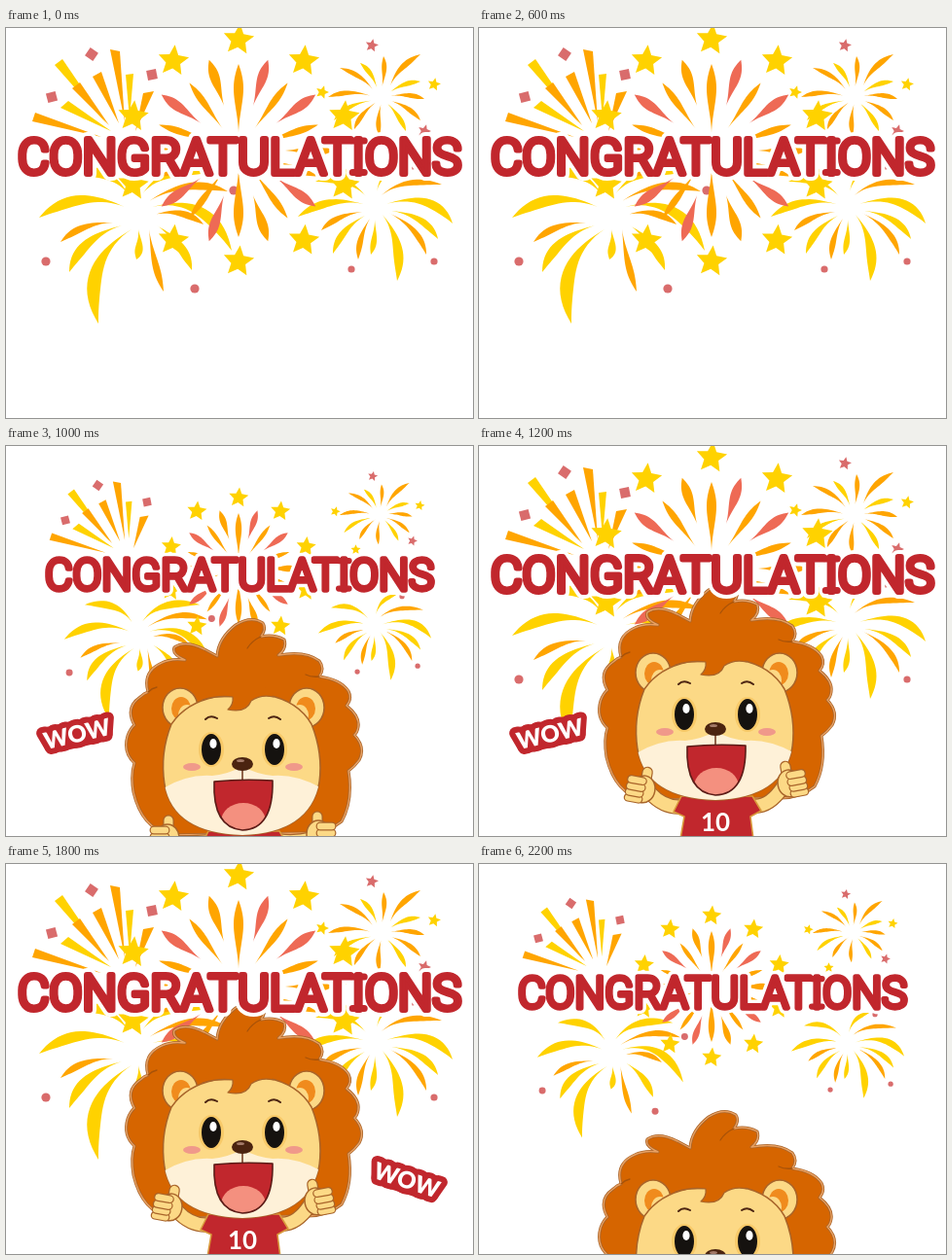
Write an HTML page with a canvas that moves like this. It is 480 px wide and 401 px high and loops after 2400 ms.

```html
<!DOCTYPE html>
<html lang="en">
<head>
<meta charset="utf-8">
<title>Congratulations</title>
<style>
html, body { margin: 0; width: 100%; height: 100%; overflow: hidden; background: #fff; }
canvas { display: block; width: 480px; height: 401px; }
</style>
</head>
<body>
<canvas id="stage" width="480" height="401" aria-label="Congratulations"></canvas>
<script>
const g = document.getElementById('stage').getContext('2d');
const YELLOW = '#ffd200', ORANGE = '#ffa500', CORAL = '#ee6a55', PINK = '#d96c6c';
const RED = '#c1272d', MANE = '#d66500', SKIN = '#fcd986', LINE = '#a8642a';
const STEP = 200, STEPS = 12;

// Transform [scale, dx, dy] of every burst for the large, small and medium beat
const BEATS = {
  title: [1, .762, .878],
  fan: [[1, 0, 0], [.515, 52.8, 45.7], [.815, 22.7, 18.5]],
  spark: [[1, 0, 0], [.47, 202, 37.5], [.755, 93, 17.5]],
  left: [[1, 0, 0], [.444, 75.8, 116.4], [.758, 34, 51]],
  right: [[1, 0, 0], [.48, 196.6, 95], [.73, 101.9, 51]],
  ring: [[1, 239, 126], [.425, 239, 126], [.64, 239, 126]]
};

// Lion per step: drop below full height and how far the hands are raised
const LION = { 4: [112, 0], 5: [36, 0], 6: [0, 1], 7: [0, 0], 8: [0, .5], 9: [0, 1], 10: [36, 1], 11: [112, 0] };

function fill(path, color, line, width = 1.5) {
  const p = typeof path === 'string' ? new Path2D(path) : path;
  g.fillStyle = color;
  g.fill(p);
  if (line) {
    g.strokeStyle = line;
    g.lineWidth = width;
    g.stroke(p);
  }
}

function oval(x, y, rx, ry, color, line) {
  const p = new Path2D();
  p.ellipse(x, y, rx, ry, 0, 0, 7);
  fill(p, color, line);
}

function line(d, color, width) {
  g.strokeStyle = color;
  g.lineWidth = width;
  g.stroke(new Path2D(d));
}

function tube(d, width) {
  line(d, LINE, width + 2.4);
  line(d, SKIN, width);
}

function poly(pts, color) {
  g.fillStyle = color;
  g.beginPath();
  pts.forEach(([x, y]) => g.lineTo(x, y));
  g.closePath();
  g.fill();
}

function star(x, y, r, color, turn = 0) {
  const pts = [];
  for (let i = 0; i < 10; i++) {
    const a = turn + i * Math.PI / 5, q = i % 2 ? r * .47 : r;
    pts.push([x + q * Math.sin(a), y - q * Math.cos(a)]);
  }
  poly(pts, color);
}

// Curved stroke, pointed at the start and fuller toward its end
function plume(x0, y0, cx, cy, x1, y1, w, color) {
  const a = [], b = [];
  for (let i = 0; i <= 20; i++) {
    const t = i / 20, u = 1 - t;
    const x = u * u * x0 + 2 * u * t * cx + t * t * x1;
    const y = u * u * y0 + 2 * u * t * cy + t * t * y1;
    const dx = u * (cx - x0) + t * (x1 - cx), dy = u * (cy - y0) + t * (y1 - cy);
    const k = w / 2 * Math.sin(Math.PI * Math.pow(t, 1.6)) / (Math.hypot(dx, dy) || 1);
    a.push([x - dy * k, y + dx * k]);
    b.unshift([x + dy * k, y - dx * k]);
  }
  poly(a.concat(b), color);
}

function placed([s, x, y], draw) {
  g.save();
  g.translate(x, y);
  g.scale(s, s);
  draw();
  g.restore();
}

function fan() {
  [[50, 38, 58, 32, 103, 98, YELLOW], [89, 50, 98, 45, 116, 98, ORANGE],
   [107, 22, 117, 24, 122, 96, ORANGE], [123, 48, 131, 47, 127, 94, YELLOW],
   [141, 67, 152, 65, 133, 106, ORANGE], [56, 82, 64, 75, 108, 106, YELLOW],
   [27, 96, 30, 87, 98, 112, ORANGE], [68, 62, 76, 56, 106, 100, ORANGE]
  ].forEach(([a, b, c, d, e, f, col]) => poly([[a, b], [c, d], [e, f]], col));
  [[88, 27, .6], [47, 71, -.25], [150, 48, -.2]].forEach(([x, y, r]) => {
    g.save();
    g.translate(x, y);
    g.rotate(r);
    g.fillStyle = PINK;
    g.fillRect(-5, -5, 10, 10);
    g.restore();
  });
}

function spark() {
  [[426, 27, 402, 40, 6], [388, 29, 390, 45, 5], [364, 36, 377, 46, 5], [343, 41, 366, 48, 5],
   [331, 71, 352, 63, 5], [337, 95, 350, 78, 5], [358, 104, 364, 88, 5], [384, 111, 381, 94, 5],
   [411, 106, 405, 90, 5], [426, 95, 414, 80, 5], [430, 73, 414, 67, 5], [426, 55, 408, 56, 5]
  ].forEach(([x, y, cx, cy, w], i) =>
    plume(386 + (x - 386) * .22, 69 + (y - 69) * .22, cx, cy, x, y, w, i % 3 === 2 ? YELLOW : ORANGE));
  star(376, 18, 7, PINK, .2);
  star(430, 106, 7, PINK, .3);
  star(440, 58, 7, YELLOW, .2);
  star(325, 66, 7, YELLOW, .3);
  star(353, 118, 7, YELLOW);
}

function dots(list, r) {
  list.forEach(([x, y]) => oval(x, y, r, r, PINK));
}

function leftPalm() {
  [[122, 184, 76, 164, 34, 195, 11, YELLOW], [126, 172, 108, 142, 62, 148, 10, YELLOW],
   [110, 200, 78, 200, 56, 220, 7, ORANGE], [119, 203, 77, 215, 65, 251, 10, YELLOW],
   [129, 207, 76, 240, 95, 304, 14, YELLOW], [136, 207, 139, 225, 134, 238, 8, YELLOW],
   [147, 207, 151, 240, 162, 271, 7, ORANGE], [155, 203, 182, 220, 191, 249, 9, YELLOW],
   [152, 192, 180, 184, 203, 202, 7, ORANGE], [150, 184, 206, 170, 232, 229, 11, YELLOW],
   [140, 171, 162, 140, 218, 148, 10, YELLOW], [147, 178, 186, 153, 228, 168, 8, ORANGE]
  ].forEach(p => plume(...p));
  dots([[41, 240], [194, 268], [234, 167]], 4.6);
}

function rightPalm() {
  [[367, 181, 332, 172, 300, 194, 8, YELLOW], [370, 173, 350, 150, 318, 158, 7, YELLOW],
   [366, 189, 340, 192, 324, 208, 6, ORANGE], [369, 193, 344, 206, 336, 232, 7, YELLOW],
   [374, 196, 362, 215, 362, 238, 6, ORANGE], [379, 197, 380, 217, 375, 233, 6, YELLOW],
   [387, 192, 409, 220, 402, 260, 10, YELLOW], [393, 190, 425, 205, 432, 233, 6, ORANGE],
   [396, 188, 430, 192, 444, 217, 7, YELLOW], [391, 181, 437, 167, 459, 201, 9, YELLOW],
   [386, 172, 408, 153, 448, 161, 6, ORANGE], [381, 168, 387, 144, 410, 140, 6, YELLOW]
  ].forEach(p => plume(...p));
  dots([[355, 248], [440, 240], [418, 142]], 3.6);
}

function ring() {
  const coral = [1, 3, 7, 11, 13, 17];
  for (let i = 0; i < 20; i++) {
    const a = i * Math.PI / 10, sx = Math.sin(a), sy = -Math.cos(a);
    const upright = i % 10 === 0;
    const [r0, r1, w] = upright ? [18, 89, 10] : i % 2 ? [48, 98, 10] : [28, 86, 7];
    plume(sx * r0, sy * r0, sx * (r0 + r1) / 2, sy * (r0 + r1) / 2, sx * r1, sy * r1, w,
      coral.includes(i) ? CORAL : ORANGE);
  }
  for (let i = 0; i < 10; i++) {
    const a = i * Math.PI / 5;
    star(114 * Math.sin(a), -114 * Math.cos(a), 16.5, YELLOW, .1);
  }
}

function title(s) {
  const word = 'CONGRATULATIONS';
  g.save();
  g.translate(240, 132.3);
  g.scale(s, s);
  g.font = '300 50px Roboto, "Liberation Sans", sans-serif';
  g.textAlign = 'left';
  g.textBaseline = 'alphabetic';
  const x = -g.measureText(word).width / 2, y = 17.8;
  const ix = x + g.measureText('CONGRATULAT').width + g.measureText('I').width / 2;
  const serifs = `M${ix - 6} ${y - 34}h12M${ix - 6} ${y - 1.5}h12`;
  g.lineWidth = 14;
  g.strokeStyle = '#fff';
  g.strokeText(word, x, y);
  line(serifs, '#fff', 14);
  g.strokeStyle = g.fillStyle = RED;
  g.lineWidth = 6;
  g.strokeText(word, x, y);
  g.fillText(word, x, y);
  line(serifs, RED, 7);
  g.restore();
}

function hand(x, y, turn, side) {
  g.save();
  g.translate(x, y);
  g.scale(side, 1);
  g.rotate(turn);
  tube('M6 -3L6 -18', 9);
  oval(5, 0, 12, 14, SKIN, LINE);
  [11, 5, -1, -8].forEach(v => tube(`M-9 ${v}H${v < 0 ? 3 : 2}`, 6.5));
  g.restore();
}

function lion(drop, lift) {
  const ly = 367 - 15 * lift, ry = 363 - 17 * lift;
  const lx = 161 + 3 * lift, rx = 326 - 2 * lift;
  g.save();
  g.translate(0, drop);

  const mane = 'M170 364Q140 358 131 320Q128 302 132 290Q120 279 125 262Q128 254 132 251' +
    'Q122 233 138 222Q142 218 146 217Q140 196 160 187Q170 182 184 184Q170 178 173 171' +
    'Q184 163 204 173L217 180Q218 162 236 148Q252 138 264 146Q268 152 262 160Q275 157 286 163' +
    'Q289 172 280 179Q308 174 322 185Q328 193 322 201Q344 204 352 216Q356 224 350 231' +
    'Q364 242 362 253Q361 259 358 261Q370 274 363 287Q358 294 352 298Q357 328 345 350Q330 362 310 362Z';
  fill(mane, MANE, LINE, 3);
  line(mane, '#e9a061', 1.4);
  line('M262 160Q253 164 248 172M322 201Q314 202 308 199M146 217Q150 213 155 212', '#a85208', 1.3);

  tube(`M207 371Q190 372 ${lx + 12} ${ly + 5}`, 13);
  tube(`M281 370Q298 372 ${rx - 12} ${ry + 5}`, 13);
  fill('M208 360L200 376L211 381L207 404H282L279 381L290 375L281 360Z', RED, '#d99a3c', 1.6);
  g.font = '700 26px Lato, "Open Sans", sans-serif';
  g.textAlign = 'center';
  g.textBaseline = 'alphabetic';
  g.fillStyle = '#fff';
  g.fillText('10', 243, 396);

  [[179, 1], [309, -1]].forEach(([x, side]) => {
    oval(x, 233, 18, 20, SKIN, LINE);
    oval(x + side, 234, 10, 12, '#f08b1d');
    oval(x + side * 7, 241, 9, 11, SKIN);
  });
  const face = new Path2D('M170 250Q185 228 215 222L268 220Q300 226 314 250Q326 280 322 310' +
    'Q312 362 243 364Q172 362 163 312Q158 280 170 250Z');
  fill(face, SKIN, LINE);
  g.save();
  g.clip(face);
  fill('M158 318Q185 301 212 303Q230 301 243 293Q256 301 274 303Q300 301 328 318V370H158Z', '#fef1d8');
  g.restore();
  fill('M202 225Q218 220 233 222Q234 230 228 235Q247 239 252 226Q262 219 275 222L266 212H212Z', MANE);
  line('M202 225Q218 220 233 222Q234 230 228 235Q247 239 252 226Q262 219 275 222', LINE, 1.2);

  line('M205 245Q210 240 217 244M270 244Q276 240 282 245', '#4c2412', 2);
  [211, 276].forEach(x => {
    oval(x, 276, 13, 18, '#f7c968');
    oval(x, 276, 10, 16, '#15120f');
    oval(x + 2, 270, 3.6, 5, '#fff');
  });
  oval(191, 294, 9, 4, '#f0998a');
  oval(296, 294, 9, 4, '#f0998a');
  line('M243 295V308', '#6b351b', 1.5);
  oval(243, 291, 11, 7, '#4b2410');
  oval(241, 287.5, 4, 1.6, '#a37a68');
  const mouth = new Path2D('M214 309Q243 306 274 308Q275 358 243 359Q212 356 214 309Z');
  fill(mouth, RED);
  g.save();
  g.clip(mouth);
  oval(244, 350, 23, 19, '#f4907f');
  g.restore();
  g.strokeStyle = '#5c1c17';
  g.lineWidth = 1.6;
  g.stroke(mouth);

  hand(lx, ly, .18 * lift, 1);
  hand(rx, ry, .18 * lift, -1);
  g.restore();
}

function wow(x, y, turn) {
  g.save();
  g.translate(x, y);
  g.rotate(turn);
  g.font = '900 24px Lato, "Open Sans", sans-serif';
  g.textAlign = 'center';
  g.textBaseline = 'alphabetic';
  const plate = new Path2D();
  plate.roundRect(-36, -14, 72, 28, 8);
  fill(plate, RED);
  g.strokeStyle = RED;
  g.lineWidth = 12;
  g.strokeText('WOW', 0, 8.5);
  g.fillStyle = '#fff';
  g.fillText('WOW', 0, 8.5);
  g.restore();
}

function draw(ms) {
  const n = Math.floor(ms / STEP) % STEPS, beat = n % 3;
  g.fillStyle = '#fff';
  g.fillRect(0, 0, 480, 401);
  g.lineCap = g.lineJoin = 'round';
  placed(BEATS.fan[beat], fan);
  placed(BEATS.spark[beat], spark);
  placed(BEATS.left[beat], leftPalm);
  placed(BEATS.right[beat], rightPalm);
  placed(BEATS.ring[beat], ring);
  if (LION[n]) lion(...LION[n]);
  title(BEATS.title[beat]);
  if (n >= 5 && n <= 7) wow(73, 296, -.23);
  if (n >= 7 && n <= 9) wow(412, 325, .31);
}

const start = performance.now();
function tick() {
  draw(performance.now() - start);
  requestAnimationFrame(tick);
}
tick();
</script>
</body>
</html>
```
